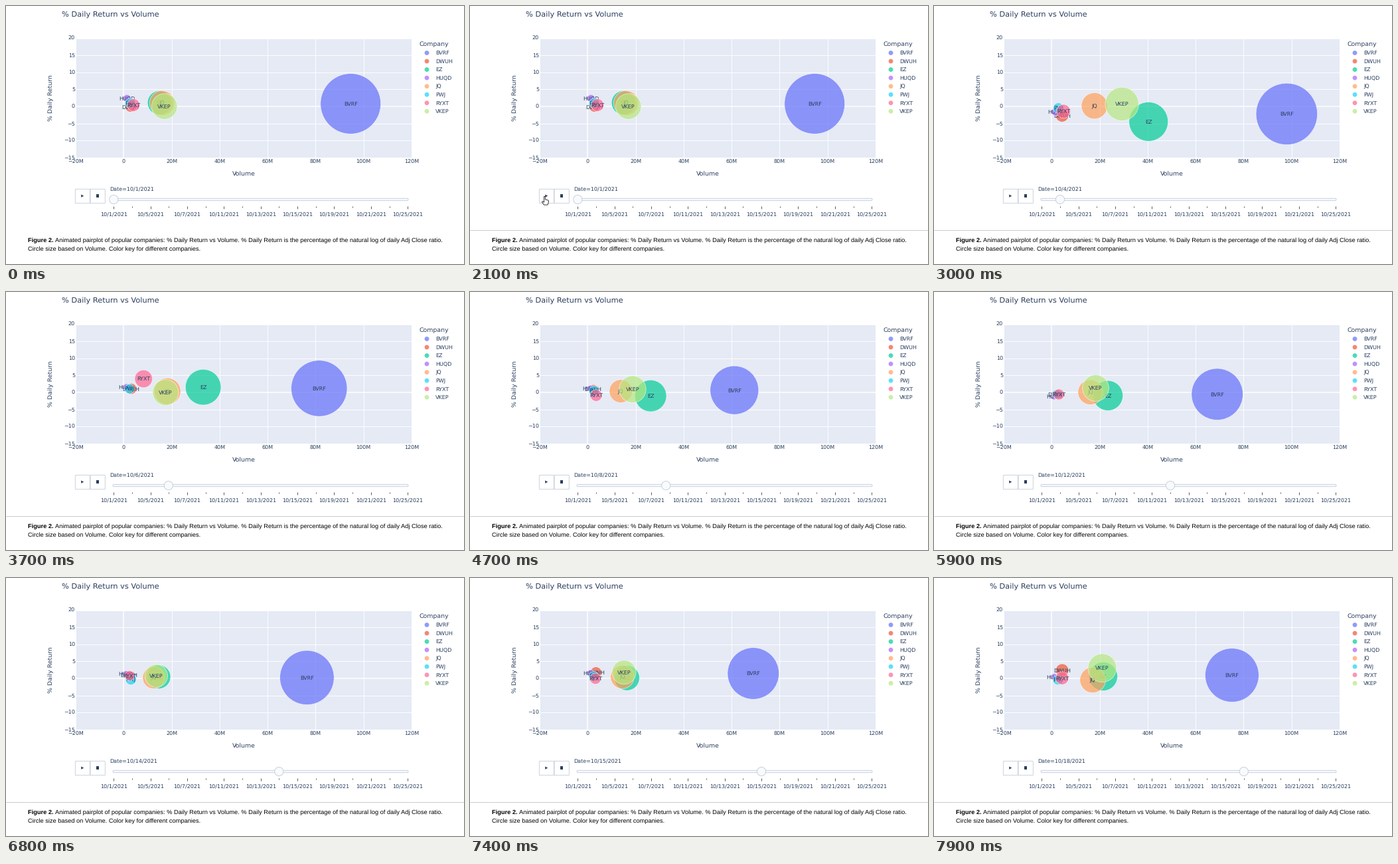
A matplotlib script that plays this animation: 690 by 388 pixels, repeating every 8 s.

```python
import matplotlib.pyplot as plt
from matplotlib.animation import FuncAnimation
from matplotlib.patches import Circle, FancyBboxPatch, Polygon, Rectangle
import numpy as np

W, H, DPI = 690, 388, 100
FRAMES, STEP_MS = 80, 100
INK, RIM, PALE = "#2a3f5f", "#bec8d9", "#f8fafc"
DAYS = [1, 4, 5, 6, 7, 8, 11, 12, 13, 14, 15, 18, 19, 20, 21, 22, 25]
LEFT, RIGHT, TOP, BOTTOM = 105, 611, 48.5, 228

plt.rcParams["font.family"] = "DejaVu Sans"
plt.rcParams["text.hinting"] = "none"

fig = plt.figure(figsize=(W / DPI, H / DPI), dpi=DPI, facecolor="white")
ax = fig.add_axes([0, 0, 1, 1])
ax.set(xlim=(0, W), ylim=(H, 0))
ax.axis("off")


def pt(px):
    return px * 72 / DPI


def sx(millions):
    return LEFT + (millions + 20) * (RIGHT - LEFT) / 140


def sy(percent):
    return BOTTOM - (percent + 15) * (BOTTOM - TOP) / 35


def radius(millions):
    return 45.4 * np.sqrt(millions / 94.6)


def label(x, y, s, px=8, ha="center", z=3, **kw):
    """Text whose capitals are centred on y."""
    kw.setdefault("color", INK)
    return ax.text(x, y + 0.36 * px, s, fontsize=pt(px), ha=ha,
                   va="baseline", zorder=z, **kw)


def line(x0, y0, x1, y1, color, px, z=1):
    return ax.plot([x0, x1], [y0, y1], color=color, lw=pt(px), zorder=z,
                   solid_capstyle="butt")[0]


def num(n):
    return str(n).replace("-", "\u2212")


def date(i):
    return f"10/{DAYS[i]}/2021"


# Plot area, grid and axes
ax.add_patch(Rectangle((LEFT, TOP), RIGHT - LEFT, BOTTOM - TOP,
                       fc="#e5eaf5", ec="none", zorder=0))
for v in range(-20, 121, 20):
    line(sx(v), TOP, sx(v), BOTTOM, "white", 1.5 if v == 0 else 0.9)
    label(sx(v), 234, num(v) + "M" if v else "0")
for p in range(-15, 21, 5):
    line(LEFT, sy(p), RIGHT, sy(p), "white", 1.5 if p == 0 else 0.9)
    label(104, sy(p), num(p), ha="right")
label(84, 12, "% Daily Return vs Volume", 11.35, "left")
label(358, 251.5, "Volume", 9.35)
ax.text(68, 138, "% Daily Return", fontsize=pt(9.35), color=INK,
        rotation=90, ha="center", va="center")
label(622, 57, "Company", 9.35, "left")


class Bubble:
    count = 0

    def __init__(self, name, color, volumes, returns):
        n = Bubble.count
        Bubble.count += 1
        self.x = [sx(v) for v in volumes]
        self.y = [sy(r) for r in returns]
        self.r = [radius(v) for v in volumes]
        self.disc = ax.add_patch(Circle((0, 0), 1, fc=color, ec="white",
                                        lw=pt(0.7), alpha=0.7, zorder=4 + n))
        self.text = label(0, 0, name, z=4.5 + n)
        row = 70.5 + 12.54 * n
        ax.add_patch(Circle((634, row), 3.4, fc=color, ec="none", alpha=0.7))
        label(647, row, name, ha="left")

    def place(self, k, p):
        j = max(k - 1, 0)
        x, y, r = (a[j] + (a[k] - a[j]) * p for a in (self.x, self.y, self.r))
        self.disc.center = x, y
        self.disc.radius = r
        self.text.set_position((x, y + 2.9))


# Daily volume in millions, daily return in percent
bubbles = [
    Bubble("BVRF", "#636efa",
           [94.6, 98.3, 80.9, 83.2, 61.7, 58.8, 64.5, 73, 78.8, 69.9, 67.9, 85.6],
           [.8, -2.5, 1.4, .6, .9, -.3, -.1, -.9, -.4, 2, .8, 1.2]),
    Bubble("DWUH", "#ef553b",
           [2.8, 4.5, 3.3, 2.5, 2.4, 2, 2, 1.8, 2.4, 2.1, 5.2, 3.2],
           [-.1, -2.9, 1, 1.3, 1.2, -.4, -1.3, 0, 1.1, .5, 3.3, 1.1]),
    Bubble("EZ", "#00cc96",
           [14.9, 42.9, 35.4, 26.4, 28.3, 17.5, 24.5, 22.5, 14.7, 14.4, 18.9, 25.2],
           [1.1, -5, 2, .2, -1.3, .3, -1.4, -.5, .2, 1.2, -1.2, 3.2]),
    Bubble("HUQD", "#ab63fa",
           [1.4, 1.6, 1.2, 1.2, 1.1, .9, .8, 1.2, 1, 1.4, 1.2, 1],
           [2.4, -2, 1.8, .9, 1.3, .6, -.9, -1.5, .9, 2.5, .2, .9]),
    Bubble("JQ", "#ffa15a",
           [16, 18, 19, 16, 14, 13, 15.5, 16.7, 12.2, 13.2, 16, 18.7],
           [1, .1, .2, .8, .4, .3, -.3, .4, 0, .8, 0, -1.1]),
    Bubble("PWJ", "#19d3f3",
           [2.7, 2.8, 2.3, 2.7, 2.7, 2.3, 2.2, 2.3, 3.1, 2.7, 2.4, 2.9],
           [.9, -.6, 1.1, .8, .5, .1, -.6, -.4, -.9, 1.3, -.2, -.7]),
    Bubble("RYXT", "#ff6692",
           [4.1, 5, 9.5, 4.6, 3.6, 3.3, 2.8, 3.2, 2.4, 2.7, 3.9, 5],
           [.4, -1.6, 5.1, .7, -1.1, .1, -.9, -.3, .8, .6, -.9, 1.5]),
    Bubble("VKEP", "#b6e880",
           [17, 30.5, 18.4, 14.6, 19.2, 16.7, 14.2, 22, 14.1, 12.2, 18.9, 24.2],
           [0, .8, -.1, .3, 1.4, -1, .8, 1.7, .7, .9, 3, 3.2]),
]

# Play and stop buttons
for x in (104.3, 127):
    ax.add_patch(FancyBboxPatch((x, 275.3), 22.3, 21.4, fc="white", ec=RIM,
                                lw=pt(0.8),
                                boxstyle="round,pad=0,rounding_size=1"))
ax.add_patch(Polygon([(113.2, 283.4), (117.2, 285.6), (113.2, 287.8)],
                     fc=INK, ec="none"))
ax.add_patch(Rectangle((136, 283.4), 4.4, 4.4, fc=INK, ec="none"))

# Date slider
SLIDE0, SLIDE_STEP = 162.3, 27.68
ax.add_patch(FancyBboxPatch((161, 289.3), 445, 3.4, fc=PALE, ec=RIM,
                            lw=pt(0.8),
                            boxstyle="round,pad=0,rounding_size=1.6"))
for i in range(len(DAYS)):
    x = SLIDE0 + i * SLIDE_STEP
    line(x, 301, x, 303 if i % 2 else 305, "#333333", 0.8)
    if i % 2 == 0:
        label(x, 313, date(i))
knob = ax.add_patch(Circle((SLIDE0, 291), 6.6, fc=PALE, ec=RIM, lw=pt(0.8),
                           zorder=5))
caption = label(156, 275, "", ha="left")

# Figure legend below the chart
rule = line(0, 336.8, W, 336.8, "#cccccc", 1)
note = dict(ha="left", color="black", family="Liberation Sans")
label(33, 352.2, "Figure 2.", 9.23, weight="bold", **note)
label(74, 352.2, "Animated pairplot of popular companies: % Daily Return vs "
      "Volume. % Daily Return is the percentage of the natural log of daily "
      "Adj Close ratio.", 9.23, **note)
label(33, 365.2, "Circle size based on Volume. Color key for different "
      "companies.", 9.23, **note)

# Mouse pointer shapes, relative to the tip
ARROW = np.array([(0, 0), (0, 11), (2.6, 8.6), (4.4, 12.2), (6, 11.4),
                  (4.4, 8), (7.8, 8)])
HAND = np.array([(-1, 0), (.8, 0), (.9, 4.4), (5.2, 5.6), (6, 7), (5.4, 10),
                 (4.4, 12.6), (-1, 12.6), (-4, 8.6), (-3.4, 7.2), (-1, 8.6)])
pointer = ax.add_patch(Polygon(ARROW, fc="white", ec="#222222", lw=pt(0.9),
                               joinstyle="round", zorder=20))


def ease(p):
    p = min(max(p, 0), 1)
    return 4 * p ** 3 if p < 0.5 else 1 - 4 * (1 - p) ** 3


def draw(i):
    t = i * STEP_MS
    k = max(0, int((t - 2030) // 515))
    since = t - (2030 + 515 * k)
    for b in bubbles:
        b.place(k, min(since / 500, 1) if k else 0)

    slide = k - 1 + ease(since / 150) if k else 0
    knob.center = SLIDE0 + slide * SLIDE_STEP, 291
    caption.set_text("Date=" + date(k))

    rule.set_visible(t >= 2100)
    pointer.set_visible(1300 <= t < 2300)
    p = min(max((t - 1300) / 600, 0), 1)
    p = 1 - (1 - p) ** 2
    tip = np.array([57 + 55.5 * p, 349 - 62.5 * p])
    pointer.set_xy(tip + (HAND if tip[1] < 297 and tip[0] > 104 else ARROW))
    return []


anim = FuncAnimation(fig, draw, frames=FRAMES, interval=STEP_MS,
                     init_func=lambda: draw(0), repeat=True, repeat_delay=0)
plt.show()
```
